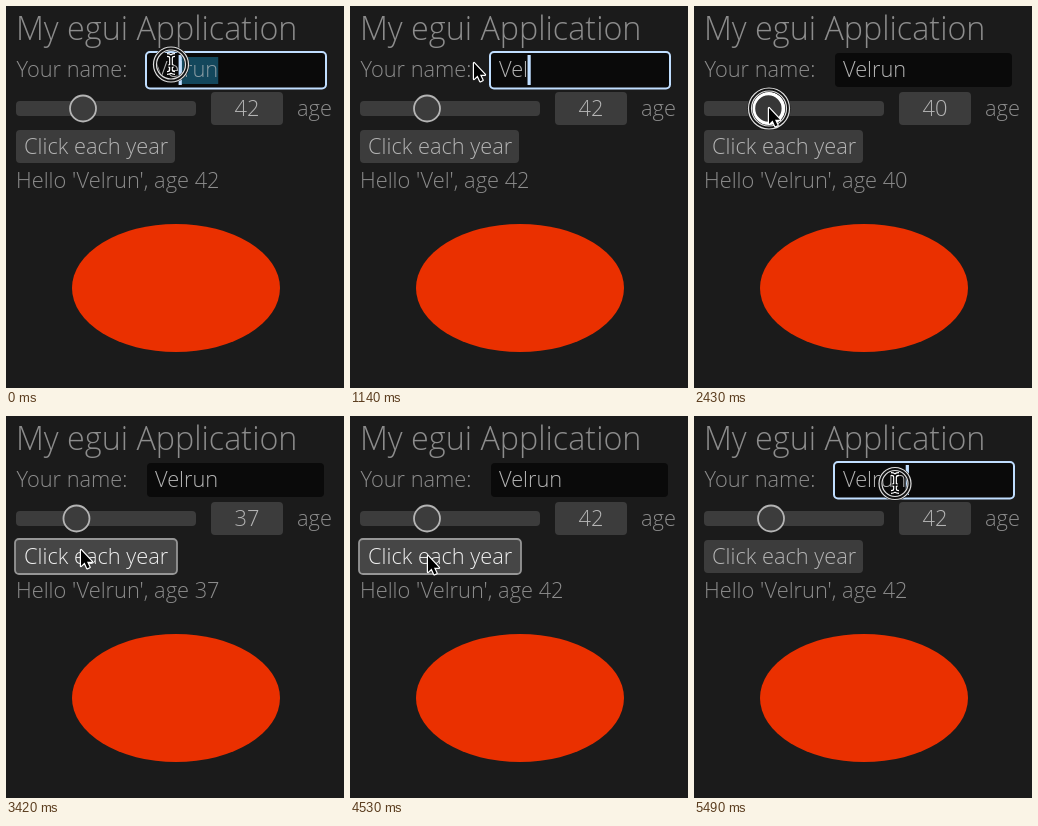
Write an HTML page with a canvas that moves like this. It is 338 px wide and 382 px high and loops after 5.52 s.

```html
<!DOCTYPE html>
<html lang="en">
<head>
<meta charset="utf-8">
<title>My egui Application</title>
<style>
  html, body { margin: 0; width: 100%; height: 100%; overflow: hidden; background: #1b1b1b; }
  canvas { display: block; }
</style>
</head>
<body>
<canvas id="stage" width="338" height="382"></canvas>
<script>
const ctx = document.getElementById('stage').getContext('2d');
const LOOP = 5520, STEP = 30;
const FONT = '"Open Sans", "Noto Sans", sans-serif';
const BODY = 21.8, NAME = 'Velrun', NAME_X = 149;
const DIM = '#8c8c8c', TEXT = '#b4b4b4', BRIGHT = '#f0f0f0', WIDGET = '#3c3c3c';
const EDGE = '#969696', CARET = '#c0deff';

// Pointer path: time, x, y
const PATH = [
  [0, 165, 58], [60, 135, 56], [330, 124, 57], [1860, 124, 57],
  [2130, 77, 103], [2220, 77, 103], [2430, 75, 102], [2730, 75, 102],
  [3000, 71, 102], [3330, 71, 102], [3420, 75, 134], [3600, 78, 140],
  [4710, 78, 140], [5190, 207, 67], [5370, 207, 67], [5490, 201, 67], [LOOP, 165, 58]
];
const KEYS = [690, 960, 1140, 1230, 1380, 1470];
const CLICK = { first: 3840, gap: 165, lead: 75, hold: 105, end: 4530 };

const clamp = (v, lo, hi) => Math.min(hi, Math.max(lo, v));
const inside = (p, x, y, w, h) => p.x >= x && p.x <= x + w && p.y >= y && p.y <= y + h;

function pointerAt(t) {
  const i = PATH.findIndex(k => k[0] > t);
  const [t0, x0, y0] = PATH[i - 1], [t1, x1, y1] = PATH[i];
  const u = (t - t0) / (t1 - t0), e = u * u * (3 - 2 * u);
  return { x: x0 + (x1 - x0) * e, y: y0 + (y1 - y0) * e };
}

function text(str, x, y, color, size = BODY, align = 'left') {
  ctx.font = `300 ${size}px ${FONT}`;
  ctx.textAlign = align;
  ctx.fillStyle = color;
  ctx.fillText(str, x, y);
}

function width(str) {
  ctx.font = `300 ${BODY}px ${FONT}`;
  return ctx.measureText(str).width;
}

function box(x, y, w, h, fill, stroke, line = 1.8) {
  ctx.beginPath();
  ctx.roundRect(x, y, w, h, 4);
  ctx.fillStyle = fill;
  ctx.fill();
  if (stroke) {
    ctx.strokeStyle = stroke;
    ctx.lineWidth = line;
    ctx.stroke();
  }
}

function circle(x, y, r, stroke, line, fill) {
  ctx.beginPath();
  ctx.arc(x, y, r, 0, 7);
  if (fill) {
    ctx.fillStyle = fill;
    ctx.fill();
  }
  ctx.strokeStyle = stroke;
  ctx.lineWidth = line;
  ctx.stroke();
}

function ageAt(t, p) {
  if (t < 2220) return 42;
  if (t < 3180) return Math.round((p.x - 22) / 1.31);
  return 37 + clamp(Math.floor((t - CLICK.first) / CLICK.gap) + 1, 0, 5);
}

function drawField(t, p, name) {
  const focus = t < 2220 || t >= 5370;
  const hover = inside(p, 141, 47, 177, 34);
  if (focus) box(140, 46, 180, 36.5, '#0a0a0a', CARET, 2);
  else if (hover) box(140, 46, 180, 36.5, '#0a0a0a', EDGE);
  else box(141, 47, 177, 34, '#0a0a0a');

  let index = name.length;
  if (t < 690 || t >= 5370) {
    index = 0;
    while (index < 6 && NAME_X + width(NAME.slice(0, index)) + width(NAME[index]) / 2 < p.x + 7) index++;
  }
  const x = NAME_X + width(name.slice(0, index));
  if (focus && index < name.length) {
    ctx.fillStyle = '#13475c';
    ctx.fillRect(x, 51, NAME_X + width(name) - x, 27);
    text(name.slice(0, index), NAME_X, 71, TEXT);
    text(name.slice(index), x, 71, '#8a9ca4');
  } else {
    text(name, NAME_X, 71, TEXT);
  }
  if (focus) {
    ctx.fillStyle = CARET;
    ctx.fillRect(x - 0.5, 49, 3.2, 30);
  }
}

function drawSlider(t, p, age) {
  const x = 22 + 1.31 * age;
  box(10, 95, 180, 15, WIDGET);
  if (t >= 2220 && t < 3180) circle(x, 102.5, 15, '#fff', 3.6, '#373737');
  else if (inside(p, 10, 87, 180, 32)) circle(x, 102.5, 14.5, BRIGHT, 2.4, '#464646');
  else circle(x, 102.5, 13, TEXT, 1.8, WIDGET);
  box(205, 86, 72, 33, WIDGET);
  text(age, 241, 110, TEXT, BODY, 'center');
  text('age', 291, 110, DIM);
}

function drawButton(t, p) {
  const since = t - CLICK.first + CLICK.lead;
  const active = since >= 0 && t < CLICK.end && since % CLICK.gap < CLICK.hold;
  const hover = inside(p, 10, 124, 159, 33);
  if (active) box(9, 123, 162, 35, '#373737', '#fff', 2);
  else if (hover) box(9, 123, 162, 35, '#464646', EDGE);
  else box(10, 124, 159, 33, WIDGET);
  text('Click each year', 18, 148, active ? '#fff' : hover ? BRIGHT : TEXT);
}

function drawRing(t, p) {
  let held = -1;
  if (t < 330) held = t + LOOP - 5370;
  else if (t >= 5370) held = t - 5370;
  else if (t >= 2220 && t < 3150) held = t - 2220;
  if (held < 60) return;
  const r = 13 + 9 * clamp((held - 60) / 180, 0, 1);
  circle(p.x, p.y + 0.5, r - 1.5, '#111', 5);
  circle(p.x, p.y + 0.5, r, '#ddd', 1.2);
  circle(p.x, p.y + 0.5, r - 3, '#ddd', 1.2);
}

function drawPointer(p) {
  const beam = inside(p, 141, 47, 177, 34);
  const shape = new Path2D(beam
    ? 'M-4-9Q0-9 0-6Q0-9 4-9M0-6V6M-4 9Q0 9 0 6Q0 9 4 9M-2.5 2H2.5'
    : 'M0 0V16L3.6 12.6L6.2 18.3L8.6 17.2L6 11.7H11Z');
  ctx.save();
  ctx.translate(p.x, p.y);
  ctx.lineJoin = 'round';
  ctx.strokeStyle = '#fff';
  ctx.lineWidth = beam ? 3.8 : 2.4;
  ctx.stroke(shape);
  if (beam) {
    ctx.strokeStyle = '#000';
    ctx.lineWidth = 1.5;
    ctx.stroke(shape);
  } else {
    ctx.fillStyle = '#000';
    ctx.fill(shape);
  }
  ctx.restore();
}

function draw(t) {
  const p = pointerAt(t), age = ageAt(t, p);
  const typed = KEYS.filter(k => t >= k).length;
  const name = t < KEYS[0] ? NAME : NAME.slice(0, typed);

  ctx.fillStyle = '#1b1b1b';
  ctx.fillRect(0, 0, 338, 382);
  text('My egui Application', 10, 34, DIM, 32.3);
  text('Your name:', 10.5, 71, DIM);
  drawField(t, p, name);
  drawSlider(t, p, age);
  drawButton(t, p);
  text(`Hello '${name}', age ${age}`, 10, 182, DIM);

  ctx.beginPath();
  ctx.ellipse(170, 282, 104, 64, 0, 0, 7);
  ctx.fillStyle = '#ea3000';
  ctx.fill();

  drawRing(t, p);
  drawPointer(p);
}

const origin = performance.now();
function tick() {
  const t = (performance.now() - origin) % LOOP;
  draw(Math.floor(t / STEP) * STEP);
  requestAnimationFrame(tick);
}
tick();
</script>
</body>
</html>
```
